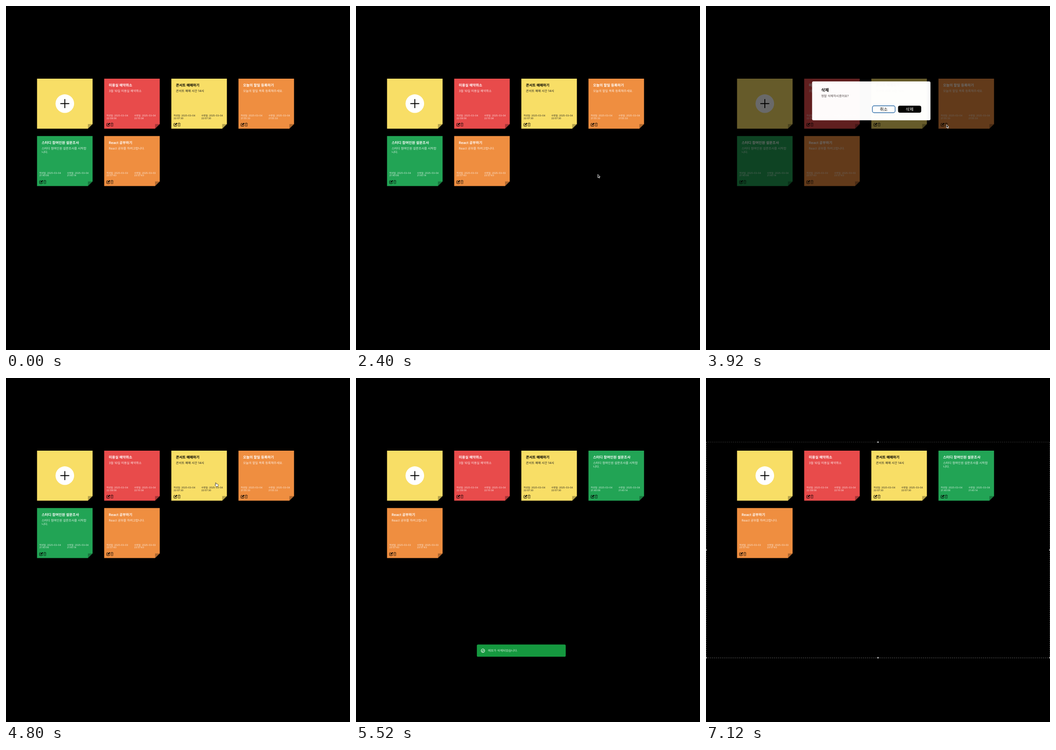
An HTML page that plays this animation: 748x748 px, repeating every 7.68 s.

```html
<!DOCTYPE html>
<html lang="ko">
<head>
<meta charset="utf-8">
<title>메모</title>
<style>
html, body { margin: 0; width: 100%; height: 100%; overflow: hidden; background: #000; }
svg { display: block; width: 100%; height: 100%; }
text { font: 6.64px Inter, 'Noto Sans CJK KR', 'Noto Sans CJK', sans-serif; text-rendering: geometricPrecision; }
.title { font-size: 7.65px; font-weight: 600; }
.date { font-size: 5.1px; }
.button { font-size: 9.2px; font-weight: 500; text-anchor: middle; }
</style>
</head>
<body>
<svg viewBox="0 0 748 748">
  <defs>
    <clipPath id="page"><rect y="138" width="748" height="472"/></clipPath>
    <g id="icons" fill="none" stroke="#000">
      <path d="M8.8 97.2H6.6Q5.5 97.2 5.5 98.3V102.3Q5.5 103.4 6.6 103.4H10.6Q11.7 103.4 11.7 102.3V100.6" stroke-width=".95"/>
      <path d="M7.7 101.2L8.1 99.4L11.5 96L12.9 97.4L9.5 100.8Z" fill="#000" stroke-width=".3"/>
      <path d="M14 97.4H19.8M15.6 97.3V96.2H18.2V97.3M14.5 97.4L14.8 103.5H19L19.3 97.4M15.9 99.5H17.9M15.9 101.3H17.9" stroke-width=".55"/>
    </g>
  </defs>
  <g id="before"></g>
  <g id="after"></g>
  <g id="modal">
    <rect y="138" width="748" height="472" opacity=".6"/>
    <rect x="230.7" y="164" width="257.4" height="84.5" rx="3" fill="#fff"/>
    <text x="250.4" y="186.2" style="font-size:9px;font-weight:600">삭제</text>
    <text x="250.4" y="197.6" fill="#4a4444">정말 삭제하시겠어요?</text>
    <rect x="361.7" y="217" width="49.6" height="15" rx="4" fill="#fff" stroke="#2b6cab" stroke-width="1.4"/>
    <text class="button" x="386.5" y="227.9">취소</text>
    <rect x="417.6" y="216.8" width="50.4" height="15.3" rx="4"/>
    <text class="button" x="442.8" y="227.9" fill="#fff">삭제</text>
  </g>
  <g clip-path="url(#page)">
    <g id="toast">
      <rect x="262.8" y="579.6" width="193.2" height="26.4" rx="2.6" fill="#15983f"/>
      <g fill="none" stroke="#fff" stroke-width="1.1">
        <circle cx="276" cy="592.9" r="3.7"/>
        <path d="M274.3 593L275.6 594.3L277.8 591.7"/>
      </g>
      <text x="286.9" y="595.4" fill="#d4ecdb">메모가 삭제되었습니다.</text>
    </g>
  </g>
  <g id="selection" fill="#bbb">
    <g fill="none" stroke="#777" stroke-width=".8" stroke-dasharray="2.5 2">
      <path d="M0 139.3H748" stroke="#444"/>
      <path d="M.5 139.3V608.6H747.5V139.3"/>
    </g>
    <g id="handles"></g>
  </g>
  <g id="cursor" stroke="#fff" stroke-width=".9" stroke-linejoin="round">
    <path id="arrow" d="M0 0V6.9L1.6 5.5L2.7 8L3.9 7.5L2.8 5.1H5Z"/>
    <path id="hand" fill="#fff" stroke="#111" stroke-width=".7" d="M-.8 .6Q0-.6 .8 .6L1.3 3Q2.1 2.4 2.8 3.1Q3.6 2.6 4.1 3.4Q5.2 3.2 5.4 4.2L5.3 6.3L4.5 8.5H1L-1.7 5.4Q-1.8 4.2-.1 4.7Z"/>
  </g>
</svg>
<script>
const LOOP = 7680, STEP = 80;
const YELLOW = '#f8de66', ORANGE = '#ef8e40', RED = '#e84b4b', GREEN = '#22a455';
const $ = id => document.getElementById(id);

const note = (color, title, body, day, made, edited = made) =>
  ({ color, title, body: body.split('|'), day, times: [made, edited] });

const add = { color: YELLOW };
const hair = note(RED, '미용실 예약취소', '3월 10일 미용실 예약취소', '2025-03-04', '22:08:06', '22:10:38');
const concert = note(YELLOW, '콘서트 예매하기', '콘서트 예매 시간 14시', '2025-03-04', '22:07:30');
const todo = note(ORANGE, '오늘의 할일 등록하기', '오늘의 할일 목록 등록해주세요.', '2025-03-04', '21:55:33');
const survey = note(GREEN, '스터디 참여인원 설문조사', '스터디 참여인원 설문조사를 시작합|니다.', '2025-03-04', '21:40:06', '21:40:14');
const study = note(ORANGE, 'React 공부하기', 'React 공부를 하려고합니다.', '2025-03-03', '23:57:43');

const text = (x, y, str, cls = '') => `<text class="${cls}" x="${x}" y="${y}">${str}</text>`;

const plus = `<circle cx="60.4" cy="54.3" r="20.2" fill="#fff"/>
  <path d="M50.7 54.3H70.1M60.4 44.6V64" stroke="#000" stroke-width="1.9"/>`;

function content(n) {
  const dark = n.color === YELLOW;
  const lines = n.body.map((s, i) => text(10, 28.9 + i * 8, s)).join('');
  const dates = ['작성일', '수정일'].map((label, i) => {
    const x = 5 + i * 60.2;
    return text(x, 82, `${label}: ${n.day}`, 'date') + text(x, 87.6, n.times[i], 'date');
  }).join('');
  return `<g fill="${dark ? '#000' : '#fff'}">${text(10, 17.1, n.title, 'title')}</g>
    <g fill="${dark ? '#222' : 'rgba(255,255,255,.85)'}">${lines}${dates}</g>
    <use href="#icons"/>`;
}

function card(n, i) {
  const x = 67.5 + (i % 4) * 146, y = 158 + Math.floor(i / 4) * 124.8;
  return `<g transform="translate(${x} ${y})">
    <path d="M0 0H120.8V98.7L110.6 108.7H0Z" fill="${n.color}"/>
    <path d="M110.6 98.7H120.8L110.6 108.7Z" opacity=".27"/>
    ${n.title ? content(n) : plus}</g>`;
}

const cards = list => list.map(card).join('');
$('before').innerHTML = cards([add, hair, concert, todo, survey, study]);
$('after').innerHTML = cards([add, hair, concert, survey, study]);

// handles sit on the selection's edges, clear of its upper corners
for (const x of [.3, 374, 747.7])
  for (const y of [139.4, 374, 608.2])
    if ((x === 374) !== (y === 374) || y > 600)
      $('handles').innerHTML += `<circle cx="${x}" cy="${y}" r="1.7"/>`;

const ramp = (t, from, to) => Math.min(1, Math.max(0, (t - from) / (to - from)));
const easeOut = k => 1 - (1 - k) ** 3;

const moves = [
  { from: 160, to: 1040, dx: -180, dy: -95.5 },
  { from: 1040, to: 2240, dx: -14, dy: 3 },
  { from: 2320, to: 3600, dx: -3, dy: -115.5 },
  { from: 4000, to: 4480, dx: -67, dy: -30.5 }
];

function pointer(t) {
  let x = 720, y = 466;
  for (const m of moves) {
    const k = ramp(t, m.from, m.to);
    x += m.dx * k;
    y += m.dy * k;
  }
  return `translate(${x} ${y})`;
}

const show = (id, on) => { $(id).style.display = on ? '' : 'none'; };

function draw(t) {
  show('before', t < 4880);
  show('after', t >= 4880);

  $('modal').setAttribute('opacity', easeOut(ramp(t, 3760, 3980)) * (1 - ramp(t, 4480, 4640)));

  const toast = easeOut(ramp(t, 4960, 5360)) * (1 - ramp(t, 5920, 6320));
  $('toast').setAttribute('opacity', toast);
  $('toast').setAttribute('transform', `translate(0 ${(1 - toast) * 31})`);

  show('selection', t >= 6640);
  show('cursor', t >= 240 && t < 5200);
  show('arrow', t < 4320);
  show('hand', t >= 4320);
  $('cursor').setAttribute('transform', pointer(t));
}

const start = performance.now();
function tick() {
  const t = (performance.now() - start) % LOOP;
  draw(Math.floor(t / STEP) * STEP);
  requestAnimationFrame(tick);
}
draw(0);
requestAnimationFrame(tick);
</script>
</body>
</html>
```
